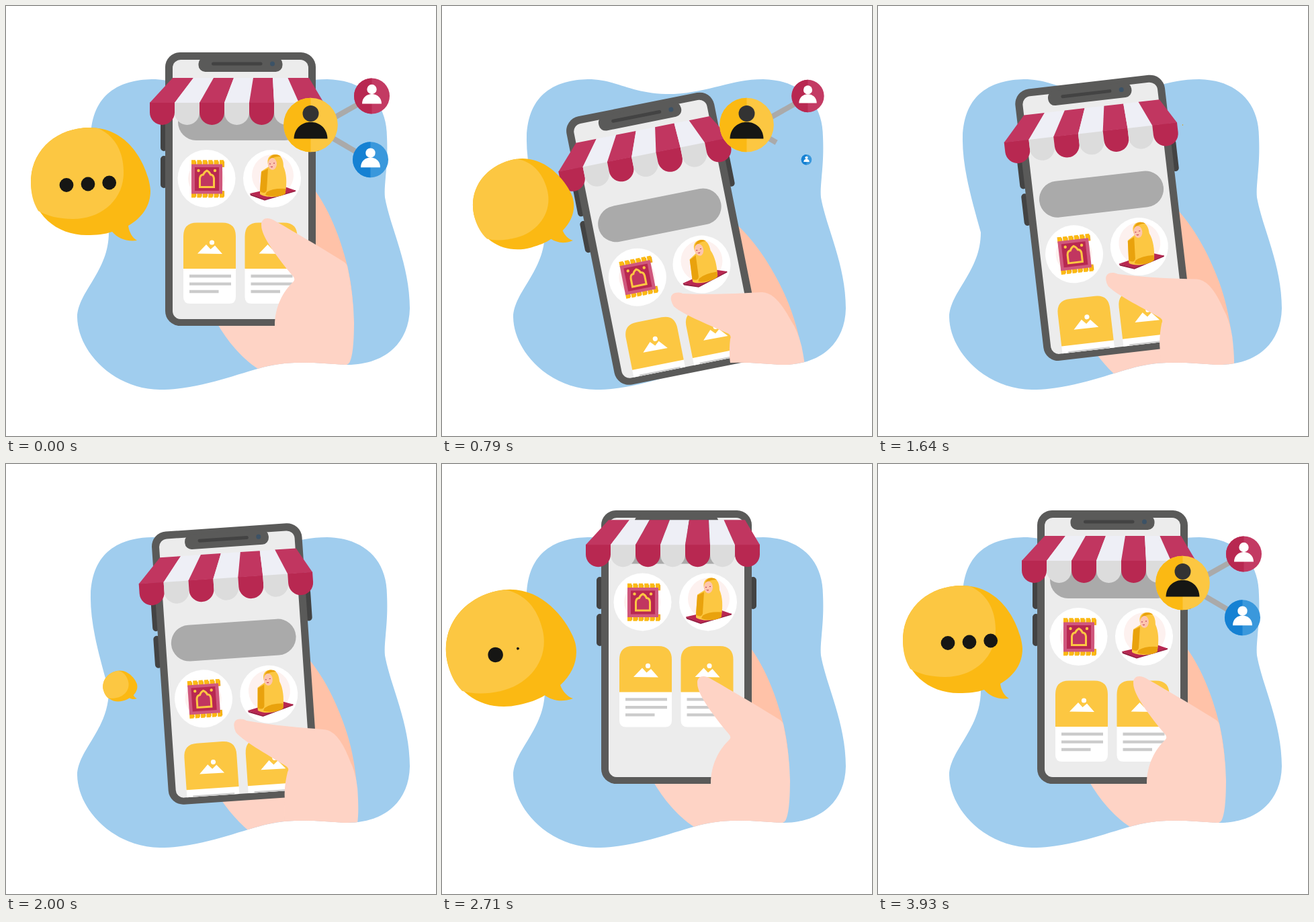
Recreate the animation shown at these times as an HTML page. Size 640x640 px, loop 4780 ms.

```html
<!DOCTYPE html>
<html lang="en">
<head>
<meta charset="utf-8">
<style>
  html, body { margin: 0; width: 100%; height: 100%; overflow: hidden; background: #fff; }
  svg { display: block; width: 100vw; height: 100vh; }
</style>
</head>
<body>
<svg viewBox="0 0 640 640">
  <defs>
    <path id="blob" d="M153 337C140 290 125 240 126 195C128 130 170 110 217 109C262 109 280 132 345 131C400 128 430 109 478 109C530 110 567 140 567 195C569 240 562 265 564 285C572 330 601 385 601 450C600 505 560 535 505 534C470 532 430 527 390 536C350 545 290 571 229 571C160 570 107 515 106 463C107 425 153 395 153 337Z"/>
    <clipPath id="inBlob"><use href="#blob"/></clipPath>
    <clipPath id="inScreen"><rect x="248" y="80" width="202" height="386" rx="12"/></clipPath>
    <g id="card">
      <path d="M264 390H342V433Q342 443 332 443H274Q264 443 264 433Z" fill="#fff"/>
      <path d="M264 391V343Q264 322.500 284 322.500H322Q342 322.500 342 343V391Z" fill="#fcc742"/>
      <path d="M285 368.500L298 355L304.500 362L311 356.500L322 369Z" fill="#fff"/>
      <circle cx="306.500" cy="352" r="3.600" fill="#fff"/>
      <path d="M273 402H335M273 413.700H335M273 425H316.500" stroke="#cbcbcb" stroke-width="4.300"/>
    </g>
    <g id="person">
      <circle cy="-10" r="7.200"/>
      <path d="M-14.500 11.500C-14.500 -8 14.500 -8 14.500 11.500Z"/>
    </g>
    <path id="fringe" d="M277 0H325" stroke-width="8.500" stroke-dasharray="6.200 2.200"/>
  </defs>

  <use href="#blob" fill="#a0cdee"/>

  <g clip-path="url(#inBlob)"><g class="tilt">
    <path d="M455 268C480 300 497 343 508 387C514 412 517 440 517 465L450 465Z" fill="#ffc2a8"/>
    <path d="M314 472C330 500 352 525 375 540L420 590H500V470Z" fill="#fed3c5"/>
  </g></g>

  <g class="tilt">
    <path d="M235 173V211M235 228V266M463 173V211" stroke="#434343" stroke-width="10" stroke-linecap="round"/>
    <rect x="237" y="69" width="224" height="407" rx="22" fill="#5a5a59"/>
    <rect x="248" y="80" width="202" height="386" rx="12" fill="#ececec"/>
    <g clip-path="url(#inScreen)"><g id="content">
      <rect x="256" y="146" width="186" height="54" rx="27" fill="#aaa"/>
      <g fill="#fff"><circle cx="298.500" cy="257" r="43"/><circle cx="396" cy="257" r="43"/></g>
      <circle cx="298" cy="257" r="27" fill="#fdf1ef"/>
      <circle cx="397" cy="252" r="31" fill="#fdf1ef"/>
      <g>
        <g stroke="#e9a20d"><use href="#fringe" y="235.500"/><use href="#fringe" y="279.500"/></g>
        <g stroke="#fbb913"><use href="#fringe" x="-1" y="233.500"/><use href="#fringe" x="-1" y="281"/></g>
        <path d="M276 235.500H322V279.500H276Z" fill="#d0577d"/>
        <path d="M281 240H317V275H281Z" fill="#b82851"/>
        <path d="M288.500 269.500V257Q289 251 293.500 251Q295 247 299 245Q303 247 304.500 251Q309 251 309.500 257V269.500Z" fill="#c13660" stroke="#fcc742" stroke-width="3"/>
        <g fill="#fcc742"><circle cx="286.500" cy="245" r="2.200"/><circle cx="311" cy="245" r="2.200"/></g>
      </g>
      <g>
        <path d="M363 279L385 287L431 274V276L385 289.500L364 282Z" fill="#952043"/>
        <path d="M363 279L412 268L431 274.500L385 288Z" fill="#b82851"/>
        <path d="M378 274L380 246L391 239C387 229 391 221 400 221C411 221 413 231 413 239C418 250 418 264 416 277C410 286 386 286 378 280Z" fill="#fcc742"/>
        <path d="M378 276L380 247L390 242L388 274Q386 281 378 276ZM388 277Q397 271 416 272L416 279C410 285 392 284 386 281Z" fill="#e9a20d"/>
        <path d="M391 234C391 225 396 221 401 221Q406 221 409 224Q398 223 393 230Z" fill="#e9a20d"/>
        <ellipse cx="396.500" cy="235" rx="6.500" ry="9" fill="#fdc5ae"/>
        <path d="M392 235h2M398 234h2M394 239q2 1.500 3 0" fill="none" stroke="#b82851"/>
      </g>
      <use href="#card"/><use href="#card" x="91.500"/>
    </g></g>
    <rect x="286.500" y="76" width="125" height="22" rx="10" fill="#5a5a59"/>
    <path d="M308.500 86H379" stroke="#434343" stroke-width="5" stroke-linecap="round"/>
    <circle cx="396.500" cy="86" r="3.500" fill="#3c5266"/>
    <g id="awning"></g>
  </g>

  <g clip-path="url(#inBlob)"><g class="tilt"><path id="hand" fill="#fed3c5"/></g></g>

  <g stroke="#aaa" stroke-width="8">
    <path id="redLink" pathLength="1" d="M480 171L535 140"/>
    <path id="blueLink" pathLength="1" d="M480 193L540 228"/>
  </g>
  <g id="red">
    <circle r="26.500" fill="#c33a63"/><path d="M0 -26.500A26.500 26.500 0 0 0 0 26.500Z" fill="#b82851"/>
    <use href="#person" fill="#fff"/>
  </g>
  <g id="blue">
    <circle r="26.500" fill="#3a98dc"/><path d="M0 -26.500A26.500 26.500 0 0 0 0 26.500Z" fill="#1581d3"/>
    <use href="#person" fill="#fff"/>
  </g>
  <g id="yellow">
    <circle r="40.300" fill="#fcc742"/><path d="M0 -40.300A40.300 40.300 0 0 0 0 40.300Z" fill="#fbb913"/>
    <circle cy="-17" r="12" fill="#333"/>
    <path d="M-25 20.500C-24 -12.500 24 -12.500 25 20.500Z" fill="#161614"/>
  </g>

  <g id="bubble">
    <path d="M182 327C203 315 215 297 215 275C214 250 190 181 125 181C75 181 37 215 37 262C38 310 75 341 120 341C135 341 147 340 158 336C166 345 178 351 195 349C188 345 183 336 182 327Z" fill="#fbb913"/>
    <path d="M137 182C168 196 175 225 175 248C175 290 140 317 100 317C78 317 60 312 48 305C40 292 37 278 37 262C37 215 75 181 125 181Z" fill="#fcc742"/>
    <g id="dots" fill="#161614">
      <circle cx="104" cy="266.500"/><circle cx="136" cy="265"/><circle cx="167.700" cy="263"/>
    </g>
  </g>
</svg>
<script>
const LOOP = 4780, FPS = 14, LAST_STEP = 55;
const $ = id => document.getElementById(id);
const place = (id, value) => $(id).setAttribute('transform', value);

// Progress from 0 to 1 between two times: linear, sine in-out, decelerating
const ramp = (t, start, end) => Math.min(1, Math.max(0, (t - start) / (end - start)));
const ease = (t, start, end) => (1 - Math.cos(Math.PI * ramp(t, start, end))) / 2;
const settle = (t, start, end, power = 2) => 1 - (1 - ramp(t, start, end)) ** power;

// Shown at both loop ends, hidden in between
const shown = (t, out, gone, back, full) => 1 - ease(t, out, gone) + ease(t, back, full);

// Thumb and palm; pull slides the tip down and left and drags the web along
function handPath(pull) {
  const at = (x, y, dx, dy) => `${x + dx * pull} ${y + dy * pull} `;
  const tip = at(380, 325, -39, 39);
  return `M${tip}c0 -9 9 -12 19 -6`
    + `C${at(420, 331, -20, 37)}${at(470, 360, -30, 14)}${at(500, 379, -25, 0)}`
    + `Q${at(506, 382, -10, 0)}${at(508, 387, 2, 42)}`
    + `Q${at(517, 430, 0, 15)}518 470C518 500 516 520 512 529C510 534 505 535 500 535L495 590H400`
    + `L${at(400, 476, 9, 0)}C${at(400, 448, 9, 17)}${at(412, 425, 0, 25)}${at(428, 410, -12, 28)}q3 -4 -1 -8`
    + `C${at(410, 382, -15, 33)}${at(385, 350, -30, 40)}${at(381, 333, -38, 41)}Q${at(380, 330, -39, 39)}${tip}Z`;
}

const ridge = [248, 279, 309, 339, 368, 397, 419.5, 451], stripeWidth = 37;
$('awning').innerHTML = ridge.slice(0, 7).map((x, i) => {
  const left = 214 + stripeWidth * i, right = left + stripeWidth, r = stripeWidth / 2;
  return `<path fill="${i % 2 ? '#dcdcdc' : '#b82851'}" d="M${left} 143.500V${177 - r}A${r} ${r} 0 0 0 ${right} ${177 - r}V143.500Z"/>
    <path fill="${i % 2 ? '#eeeff6' : '#c13660'}" d="M${x} 107H${ridge[i + 1]}L${right} 144H${left}Z"/>`;
}).join('');

function showContact(name, x, y, scale) {
  place(name, `translate(${x} ${y}) scale(${scale})`);
  const link = $(name + 'Link');
  link.style.strokeDasharray = `${scale} 2`;
  link.style.visibility = scale > .05 ? 'visible' : 'hidden';
}

function draw(t) {
  const tilt = 11.3 * (ease(t, 0, 800) - ramp(t, 1030, 2510));
  for (const g of document.querySelectorAll('.tilt')) g.setAttribute('transform', `rotate(${-tilt} 713 401)`);

  // The thumb drags the page down, flicks it up, then it settles back
  const drag = ease(t, 0, 780);
  $('hand').setAttribute('d', handPath(drag - ease(t, 2080, 2520)));
  place('content', `translate(0 ${64 * drag - 116 * ease(t, 2080, 2710) + 52 * settle(t, 2710, 3850)})`);
  place('awning', `translate(0 ${26 * (settle(t, 2860, 3750) - ease(t, 2380, 2790))})`);

  place('yellow', `translate(453.500 177) scale(${shown(t, 1230, 1680, 2710, 3200)})`);
  showContact('red', 544.5, 134, shown(t, 680, 1230, 3180, 3530));
  showContact('blue', 542.5, 228.7, shown(t, 500, 950, 3450, 3920));

  // The bubble swings and swells around its tail
  const swing = 1.2 * (ease(t, 0, 670) - ease(t, 2560, 3110));
  const size = shown(t, 620, 1130, 1820, 2350) * (1 + .08 * swing);
  place('bubble', `translate(195 349) rotate(${-13 * swing}) scale(${size}) translate(-195 -349)`);

  const leaving = t < 1200;
  place('dots', `translate(${leaving ? -14 - 28 * ease(t, 0, 350) : 0} 0)`);
  [...$('dots').children].forEach((dot, i) => {
    const start = 2250 + 440 * i;
    dot.setAttribute('r', 10.4 * (leaving ? 1 - ease(t, 50 * i, 50 * i + 250) : settle(t, start, start + 400, 3)));
  });
}

function tick() {
  const t = performance.now() % LOOP;
  draw(Math.min(LAST_STEP, Math.floor((t + 5) * FPS / 1000)) * 1000 / FPS);
  requestAnimationFrame(tick);
}
tick();
</script>
</body>
</html>
```
